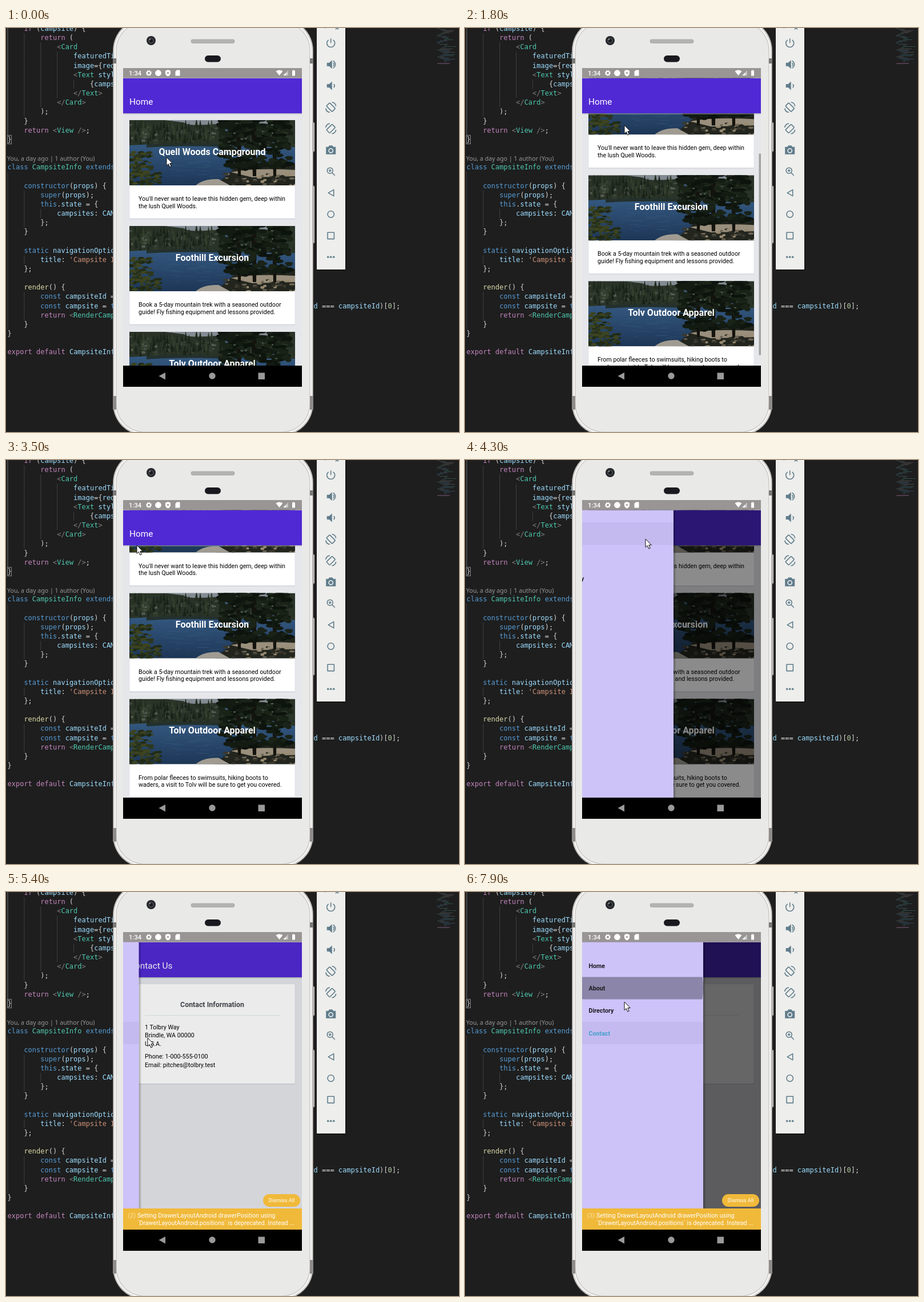
Write an HTML page that moves like this. It is 793 by 706 pixels and loops after 8 s.

```html
<!DOCTYPE html>
<html lang="en">
<head>
<meta charset="utf-8">
<title>Campsite app in a phone emulator</title>
<style>
html, body { margin: 0; width: 100%; height: 100%; overflow: hidden; background: #1e1e1e; }
svg { display: block; width: 793px; height: 706px; }
text { font: 10.7px Roboto, sans-serif; white-space: pre; }
.code text { font: 12px "DejaVu Sans Mono", monospace; fill: #d4d4d4; }
.code .lens { font: 10.6px "Noto Sans", sans-serif; fill: #999; }
.bar { font-size: 15.4px; fill: #fff; }
.title { font-size: 16px; font-weight: 700; fill: #fff; text-anchor: middle; }
.heading { font-size: 12.4px; font-weight: 700; fill: #43484d; text-anchor: middle; }
.item { font-weight: 700; fill: #1b1a20; }
.item.on { fill: #45a0cc; }
.warn { fill: #fff; }
.icons { fill: none; stroke: #607d8b; stroke-width: 1.6; stroke-linejoin: round; }
.icons .solid { fill: #607d8b; stroke: none; }
</style>
</head>
<body>
<svg id="stage" viewBox="0 0 793 706" xmlns="http://www.w3.org/2000/svg"></svg>
<script>
const LOOP = 8000, STEP = 100;
const DRAWER_W = 213, MAX_SCROLL = 113.5, ROW_H = 39.2;
const CHAR_W = 7.224, LINE_H = 16.15;

let seed = 11;
const rand = (lo = 0, hi = 1) => {
  seed = (seed * 16807) % 2147483647;
  return lo + (hi - lo) * seed / 2147483647;
};
const repeat = (n, fn) => Array.from({ length: n }, (_, i) => fn(i)).join('');
const pick = list => list[Math.floor(rand(0, list.length))];
const rect = (x, y, w, h, fill, more = '') =>
  `<rect x="${x}" y="${y}" width="${w}" height="${h}" fill="${fill}" ${more}/>`;
const circle = (x, y, r, fill, more = '') => `<circle cx="${x}" cy="${y}" r="${r}" fill="${fill}" ${more}/>`;
const text = (x, y, s, more = '') => `<text x="${x}" y="${y}" ${more}>${s}</text>`;
const path = (d, fill, more = '') => `<path d="${d}" fill="${fill}" ${more}/>`;

// Editor
const CODE = `    if (campsite) {
        return (
            <Card
                featuredTi
                image={req
                <Text styl
                    {camps
                </Text>
            </Card>
        );
    }
    return <View />;
}


class CampsiteInfo extends

    constructor(props) {
        super(props);
        this.state = {
            campsites: CAM
        };
    }

    static navigationOptio
        title: 'Campsite I
    };

    render() {
        const campsiteId =
        const campsite = t
        return <RenderCamp
    }
}

export default CampsiteInf`.split('\n');

const TOKEN_COLORS = [
  [/^'/, '#ce9178'],
  [/^(if|return|export|default)$/, '#c586c0'],
  [/^(class|extends|constructor|super|this|static|const|t)$/, '#569cd6'],
  [/^render$/, '#dcdcaa'],
  [/^[<>\/]+$/, '#808080'],
  [/^\d/, '#b5cea8'],
  [/^(Card|Text|View|RenderCamp|CampsiteInfo)$/, '#4ec9b0'],
  [/^\w/, '#9cdcfe'],
  [/./, '#d4d4d4'],
];
const esc = s => s.replace(/</g, '&lt;').replace(/>/g, '&gt;');
const highlight = s => s.match(/'.*|\w+|[<>\/]+|[^\w<>\/']+/g)
  .map(w => `<tspan fill="${TOKEN_COLORS.find(([re]) => re.test(w))[1]}">${esc(w)}</tspan>`).join('');
const indentOf = line => line.search(/\S/);
function codeLine(line, row, x0 = 2.5) {
  const indent = indentOf(line);
  if (indent < 0) return '';
  const guides = repeat(Math.max(0, indent / 4 - 1), i =>
    rect(x0 + (i + 1) * 4 * CHAR_W, LINE_H * row - 7, 1, LINE_H, '#404040'));
  return guides + text(x0 + indent * CHAR_W, 5 + row * LINE_H, highlight(line.trim()));
}
const editor = `<g class="code">
  ${rect(2.5, 0, 1, 187, '#707070')}${rect(2.5, 251, 1, 275, '#404040')}
  ${rect(2.5, 187.5, 7, 15, 'none', 'stroke="#888"')}
  ${CODE.map((line, row) => codeLine(line, row)).join('')}
  ${codeLine('d === campsiteId)[0];', 30, 538.5)}
  ${text(2, 232, 'You, a day ago | 1 author (You)', 'class="lens"')}
</g>`;
const minimap = repeat(30, i => rect(755 + 4 * Math.round(1.5 - 1.5 * Math.cos(i)), i * 2, rand(4, 24), 1,
  pick(['#4e7180', '#6a6a6a', '#3d7568', '#3f6485']), 'opacity=".55"')) + rect(755, 61.5, 22, 1, '#80587c');

// Phone
const shell = (inset, fill) =>
  rect(187 + inset, -16 + inset, 351 - 2 * inset, 728 - 2 * inset, fill, `rx="${55 - inset}"`);
const sideButton = (y, h) => rect(535, y, 5, h, '#d0cecc', 'rx="1.5" stroke="#777" stroke-width=".7"');
const phone = `${sideButton(165, 51)}${sideButton(276, 100)}
  ${shell(0, '#8d8987')}${shell(1, '#d9d7d5')}${shell(3, '#f7f7f6')}${shell(5.5, '#bdbbb9')}${shell(6.5, '#e9e9e8')}
  ${[187, 532].map(x => rect(x, 53, 6, 9, '#7b7977') + rect(x, 643, 6, 24, '#8e8b89')).join('')}
  ${circle(254, 22, 8, '#25262a')}${circle(254, 22, 5, '#44474b')}${circle(254, 22, 3, '#17181b')}${circle(252, 20, 1.3, '#8a8e90')}
  ${rect(324, 20, 76, 6.5, '#b3b3b3', 'rx="3" stroke="#9a9a9a" stroke-width=".6"')}
  ${rect(348, 48, 28, 11.5, '#19191f', 'rx="5.7"')}
  ${rect(205, 70, 313, 557, '#e6e7eb')}`;

const statusBar = `${rect(205, 70, 313, 17.5, '#999594')}
  ${text(215, 83, '1:34', 'fill="#fff" style="font-size:11.3px;font-weight:500"')}
  ${circle(250, 78.7, 3, 'none', 'stroke="#fff" stroke-width="2"')}
  ${circle(250, 78.7, 4.4, 'none', 'stroke="#fff" stroke-width="1.3" stroke-dasharray="1.7 1.75"')}
  ${circle(266.5, 78.7, 5.4, '#fff')}
  ${path('M283.5 73l4.6 1.8v3.6q0 4-4.6 6q-4.6-2-4.6-6v-3.6z', '#fff')}${circle(283.5, 78.5, 1.6, '#999594')}
  ${path('M299 73.5h5.5v10h-8v-7.5z', '#fff')}
  ${path('M472.5 75.5q6-4 12 0l-6 7.5z', '#fff')}${path('M494 74v9h-9z', '#c5c3c2')}${path('M490.5 78v5h-5z', '#fff')}
  ${path('M501 74.5h1.5v-1h2v1h1.5v9h-5z', '#fff')}`;

const navBar = `${rect(205, 590, 313, 37, '#000')}${path('M279 602v12.5l-11.5-6.25z', '#999')}
  ${circle(361, 608, 5.7, '#999')}${rect(441.5, 602.5, 11.5, 11.5, '#999')}`;

// Lake scene, 290 x 114
const fir = (x, y, h, fill) => path(`M${x} ${y - h}l${h * .17} ${h}h${-h * .34}z`, fill);
const blobs = (n, x, y, w, h, colors, size) => repeat(n, () =>
  `<ellipse cx="${rand(x, x + w)}" cy="${rand(y, y + h)}" rx="${rand(size / 2, size)}" ry="${rand(size / 4, size / 2)}" fill="${pick(colors)}"/>`);
const trunk = (x, w) => path(`M${x} 0l3 98h${w}l1-98z`, '#14130e');
const PINE = ['#0d130d', '#131b12', '#1a2317'], BUSH = ['#1f2916', '#2c361c', '#3c431f'];
const STONE = ['#3b392f', '#6f6655', '#24261e', '#97896f'];
const scene = `<g id="scene" clip-path="url(#sceneClip)">
  ${rect(0, 0, 290, 114, '#2a3327')}
  ${path('M62 0H250V7Q200 3 150 7T95 4Z', '#828a92')}
  ${blobs(70, 0, 8, 250, 30, ['#565b52', '#464e43', '#333d2e'], 5)}
  ${repeat(190, () => fir(rand(0, 290), rand(12, 44), rand(8, 18), pick(['#192218', '#222c1f', '#343e2d', '#1d261c'])))}
  ${path('M0 44Q90 39 170 43T290 47V114H0Z', 'url(#water)')}
  ${path('M30 42Q110 38 200 44L195 48Q100 43 30 48Z', '#23302d')}
  ${repeat(40, () => rect(rand(45, 190), rand(50, 100), rand(8, 24), .8, '#507298', 'opacity=".28"'))}
  ${path('M190 80Q230 70 290 76V114H150Z', '#22251e')}
  ${path('M178 91Q215 83 290 87V98L215 100Z', '#9a8f7c')}
  ${path('M116 114Q130 102 156 103L176 114Z', '#a09b91')}
  ${blobs(45, 165, 94, 125, 20, STONE, 5)}
  ${blobs(110, -5, 55, 44, 62, BUSH, 6)}${blobs(25, 30, 92, 24, 24, BUSH, 5)}
  ${trunk(187, 5)}${trunk(213, 6)}${trunk(249, 5)}
  ${blobs(150, 160, 0, 70, 84, PINE, 10)}${blobs(120, 230, 0, 54, 82, PINE, 9)}
  ${blobs(18, 168, 4, 115, 60, ['#3f5d80', '#4b5a4c'], 3)}
</g>`;

const CARDS = [
  ['Quell Woods Campground', "You'll never want to leave this hidden gem, deep within", 'the lush Quell Woods.'],
  ['Foothill Excursion', 'Book a 5-day mountain trek with a seasoned outdoor', 'guide! Fly fishing equipment and lessons provided.'],
  ['Tolv Outdoor Apparel', 'From polar fleeces to swimsuits, hiking boots to', 'waders, a visit to Tolv will be sure to get you covered.'],
];
const ADDRESS = ['1 Tolbry Way', 'Brindle, WA 00000', 'U.S.A.'];
const CONTACTS = ['Phone: 1-000-555-0100', 'Email: pitches@tolbry.test'];
const lines = (list, x, y, pitch) => list.map((s, i) => text(x, y + i * pitch, s)).join('');
const cardBox = h => rect(216, 161.8, 290, h, '#b9bfc9', 'opacity=".6"') +
  rect(216, 160.5, 290, h, '#fff', 'stroke="#dce2e9" stroke-width=".8"');
const card = ([title, ...body], i) => `<g transform="translate(0 ${i * 185})">
  ${cardBox(172.5)}<use href="#scene" x="216" y="161"/>
  ${text(361, 221.5, title, 'class="title"')}${lines(body, 232, 302, 12.5)}</g>`;
const appBar = title => rect(205, 149, 313, 2, '#9aa', 'opacity=".5"') +
  rect(205, 87.5, 313, 61.5, '#5129d4') + text(216, 133.5, title, 'class="bar"');

const homePage = `<g id="home"><g id="list">${CARDS.map(card).join('')}</g>
  <rect id="thumb" x="514.5" width="3.5" height="352" fill="#000"/>${appBar('Home')}</g>`;
const contactPage = `<g id="contact">${cardBox(174.5)}
  ${text(361, 201, 'Contact Information', 'class="heading"')}${rect(243, 215, 236, 1, '#e1e8ee')}
  ${lines(ADDRESS, 243, 239.5, 14.8)}${lines(CONTACTS, 243, 291.4, 14.8)}${appBar('Contact Us')}</g>`;

const rowTop = i => 109.2 + i * ROW_H;
const drawer = `<rect id="scrim" x="205" y="87.5" width="313" height="503" fill="#000"/>
  <g id="drawer">${rect(417, 87.5, 5, 503, 'url(#edge)')}${rect(204, 87.5, DRAWER_W, 503, '#cdc3f9')}
  <rect id="active" x="204" width="${DRAWER_W}" height="${ROW_H}" fill="#c4baf0"/>
  <g clip-path="url(#rowClip)"><circle id="ripple" cx="279" fill="#000" opacity=".32"/></g>
  ${['Home', 'About', 'Directory', 'Contact'].map((s, i) => text(216.5, rowTop(i) + 23.8, s, 'class="item"')).join('')}</g>`;
const warning = `<g id="warning">${rect(450, 528, 65, 22, '#f0b93a', 'rx="11"')}
  ${text(482.5, 542.3, 'Dismiss All', 'class="warn" text-anchor="middle" style="font-size:9.2px"')}
  ${rect(205, 553, 313, 37, '#f0b93a')}
  ${text(213.5, 569, '', 'id="count" fill="#f9dfa5"')}
  <g class="warn">${lines(['Setting DrawerLayoutAndroid drawerPosition using',
    '`DrawerLayoutAndroid.positions` is deprecated. Instead ...'], 230, 569, 13)}</g></g>`;

// Emulator toolbar: icons drawn around (0, 0), evenly spaced
const line = d => `<path d="${d}"/>`;
const solid = d => `<path class="solid" d="${d}"/>`;
const speaker = solid('M-7-3h4l5-4.5v15l-5-4.5h-4z');
const turned = angle => `<g transform="scale(${Math.sign(angle)} 1)">
  <rect x="-4" y="-7" width="8" height="14" rx="1" transform="rotate(45)"/>${line('M-2-9q-6 1-7 7M2 9q6-1 7-7')}</g>`;
const ICONS = [
  line('M-4-5.5a7 7 0 1 0 8 0M0-8v8'),
  speaker + line('M4-3q3 3 0 6M4-6.5q8 6.5 0 13'),
  speaker + line('M5-3q3 3 0 6'),
  turned(-45),
  turned(45),
  solid('M-8.5-5.5h4l2-2.500h5l2 2.500h4v13h-17z') + '<circle cy="1" r="3.6" stroke="#eeeeec"/>',
  '<circle cx="-1.5" cy="-1.5" r="5"/>' + line('M2 2l5 5M-4-1.500h5M-1.500-4v5'),
  line('M5-5.500v11l-9.500-5.500z'),
  '<circle r="5.7"/>',
  line('M-5.700-5.700h11.400v11.400h-11.400z'),
  repeat(3, i => `<circle class="solid" cx="${i * 5 - 5}" r="1.8"/>`),
];
const toolbar = `${rect(544, 0, 52, 424, '#000', 'opacity=".25"')}${rect(544, 0, 50, 422, '#eeeeec')}
  <g class="icons">${line('M556-.5h5M577-3l5 5.500M582-3l-5 5.500')}
  ${ICONS.map((body, i) => `<g transform="translate(568.7 ${26.3 + i * 37.4})">${body}</g>`).join('')}</g>`;

document.getElementById('stage').innerHTML = `<defs>
  <clipPath id="sceneClip"><rect width="290" height="114"/></clipPath>
  <clipPath id="screenClip"><rect x="205" y="87.5" width="313" height="502.5"/></clipPath>
  <clipPath id="rowClip"><rect id="row" x="204" width="${DRAWER_W}" height="${ROW_H}"/></clipPath>
  <linearGradient id="water" x2="0" y2="1"><stop stop-color="#345880"/><stop offset="1" stop-color="#1d3656"/></linearGradient>
  <linearGradient id="edge"><stop stop-opacity=".3"/><stop offset="1" stop-opacity="0"/></linearGradient>
  ${scene}</defs>
  ${rect(0, 0, 793, 706, '#1e1e1e')}${editor}${minimap}${toolbar}${phone}
  <g clip-path="url(#screenClip)">${homePage}${contactPage}${drawer}${warning}</g>
  ${statusBar}${navBar}
  ${path('M0 0V14.5L3.3 11.5L5.7 17L8.2 16L5.8 10.6H10.3Z', '#fff', 'id="pointer" stroke="#111"')}`;

// Motion: ramp is linear 0..1, glide decelerates
const ramp = (t, start, span) => Math.min(1, Math.max(0, (t - start) / span));
const glide = (t, start, span) => Math.sin(ramp(t, start, span) * Math.PI / 2);

// Pointer strokes: start, duration, x, y; it rests in between
const STROKES = [
  [0, 300, 507, 123], [300, 300, 211, 250],
  [700, 200, 534, 45], [900, 100, 470, 552], [1000, 100, 407, 286],
  [1200, 300, 279, 260], [1600, 200, 279, 170], [1900, 600, 217, 160],
  [2500, 400, 400, 155], [3000, 500, 229, 149], [3500, 400, 196, 150],
  [4000, 300, 316, 138], [4300, 600, 248, 255],
  [5800, 200, 502, 200], [6000, 300, 215, 123],
  [6400, 300, 395, 108], [6700, 600, 268, 206], [7300, 300, 279, 172], [7700, 200, 279, 192],
];
const pointerAt = t => STROKES.reduce(([x, y], [start, span, tx, ty]) => {
  const u = ramp(t, start, span);
  return [x + (tx - x) * u, y + (ty - y) * u];
}, [281, 226]);

const drawerAt = t => DRAWER_W * (
  glide(t, 2500, 400) - glide(t, 3000, 400) +
  glide(t, 4000, 550) - glide(t, 5100, 450) +
  glide(t, 6400, 525));

const byId = id => document.getElementById(id);
const set = (id, attrs) => Object.entries(attrs).forEach(([k, v]) => byId(id).setAttribute(k, v));
const show = (id, on) => set(id, { display: on ? 'inline' : 'none' });
const items = [...document.querySelectorAll('.item')];

function render(t) {
  const open = drawerAt(t), scroll = MAX_SCROLL * glide(t, 1600, 350);
  const onContact = t >= 5100, active = onContact ? 3 : 0;
  const pressed = onContact ? 1 : 3, pressTime = onContact ? 7700 : 4900;
  set('pointer', { transform: `translate(${pointerAt(t)})` });
  set('list', { transform: `translate(0 ${-scroll})` });
  set('thumb', { y: 149 + scroll * .795, opacity: .3 * (ramp(t, 1600, 100) - ramp(t, 2100, 400)) });
  show('home', !onContact);
  show('contact', onContact);
  show('warning', onContact);
  set('scrim', { opacity: .6 * open / DRAWER_W });
  set('drawer', { transform: `translate(${open - DRAWER_W} 0)` });
  show('drawer', open > .5);
  set('active', { y: rowTop(active) });
  items.forEach((el, i) => el.classList.toggle('on', i === active));
  set('row', { y: rowTop(pressed) });
  set('ripple', { cy: rowTop(pressed) + ROW_H / 2, r: 138 * ramp(t, pressTime, 200) });
  byId('count').textContent = t < 7800 ? '(2)' : '(3)';
}

const start = performance.now();
function tick() {
  const elapsed = (performance.now() - start) % LOOP;
  render(Math.floor(elapsed / STEP) * STEP);
  requestAnimationFrame(tick);
}
tick();
</script>
</body>
</html>
```
